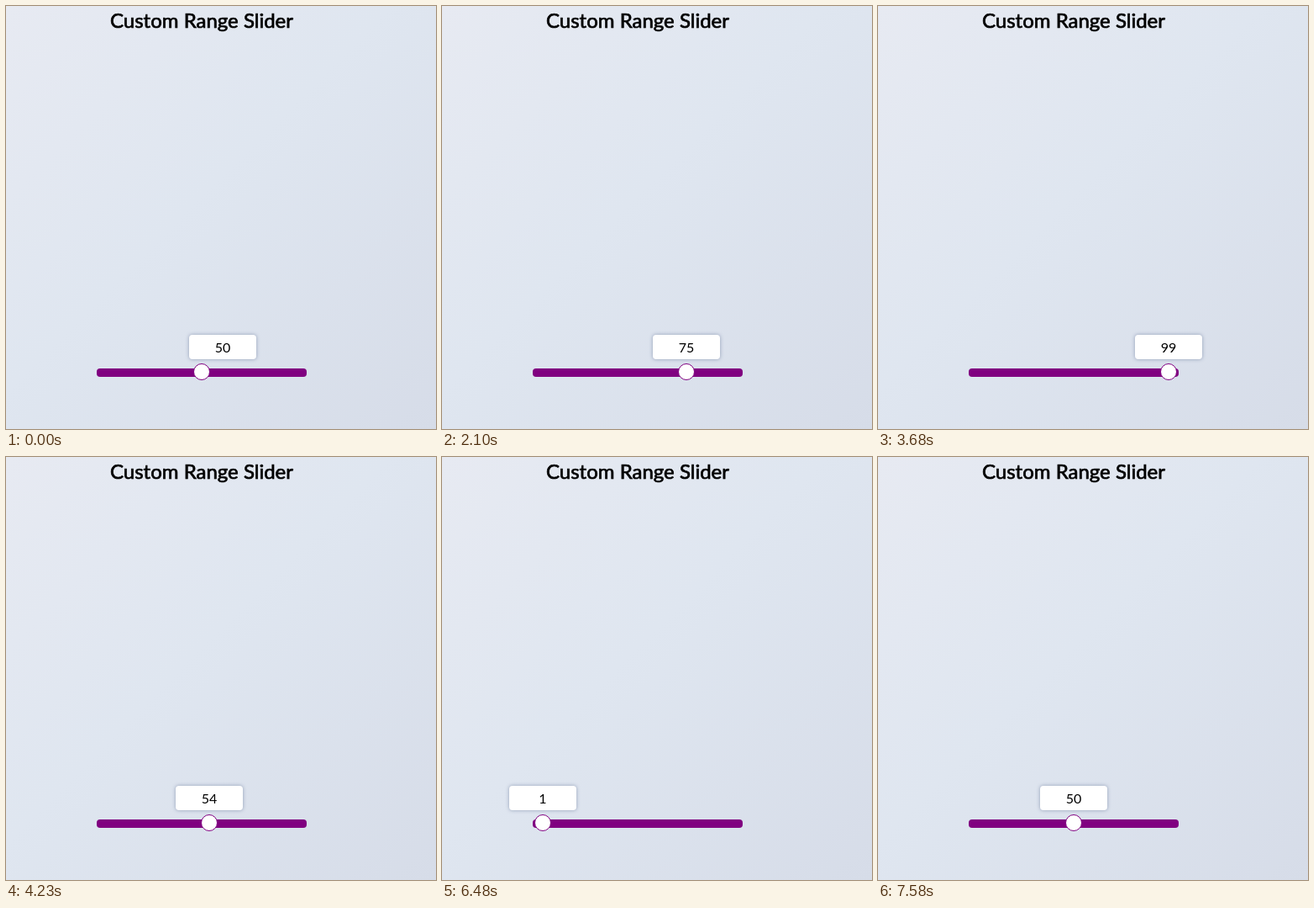
Write an HTML page that moves like this. It is 512 px wide and 503 px high and loops after 8520 ms.

```html
<!DOCTYPE html>
<html lang="en">
<head>
<meta charset="utf-8">
<title>Custom Range Slider</title>
<style>
  html, body { margin: 0; width: 100%; height: 100%; overflow: hidden; }
  body {
    position: relative;
    font-family: Lato, sans-serif;
    color: #000;
    background: linear-gradient(135deg, #e7eaf2, #dfe6f0 45%, #d6dce8);
  }
  h2 {
    position: absolute; left: 0; top: 2px; width: 466px; margin: 0;
    font-size: 24px; font-weight: 400; line-height: 29px; text-align: center;
    -webkit-text-stroke: .7px #000;
  }
  .track {
    position: absolute; left: 108px; top: 431px; width: 250px; height: 10px;
    border-radius: 4px; background: #800080;
  }
  .thumb {
    position: absolute; left: -10px; top: 425px; width: 20px; height: 20px;
    box-sizing: border-box; border: 1px solid #800080; border-radius: 50%; background: #fff;
  }
  .bubble {
    position: absolute; left: -40px; top: 391px; width: 80px; height: 29px;
    border-radius: 4px; background: #fff; box-shadow: 0 0 4px rgba(70, 90, 130, .5);
    font-size: 16px; line-height: 29px; text-align: center;
  }
</style>
</head>
<body>
<h2>Custom Range Slider</h2>
<div class="track"></div>
<div class="thumb"></div>
<output class="bubble">50</output>
<script>
const LOOP = 8520;
const TICK = 68.5;

// Each drag slows down towards its end; a higher ease slows it more
const drags = [
  { start: 1140, end: 3150, from: 51, to: 100, ease: 1.05 },
  { start: 3680, end: 5400, from: 99, to: 0, ease: 1.56 },
  { start: 6480, end: 7580, from: 1, to: 50, ease: 1.6 }
];

const thumb = document.querySelector('.thumb');
const bubble = document.querySelector('.bubble');

function dragValue({ start, end, from, to, ease }, t) {
  const ticks = Math.round((end - start) / TICK);
  const progress = (t - start) / (end - start);
  const stepped = Math.min(1, Math.floor(progress * ticks + .2) / ticks);
  return Math.round(from + (to - from) * (1 - (1 - stepped) ** ease));
}

const moveTo = (el, x) => { el.style.transform = `translateX(${x}px)`; };

function draw(t) {
  const drag = drags.filter(d => d.start <= t).pop();
  const value = drag ? dragValue(drag, t) : 50;
  const x = Math.round(118 + 2.3 * value);
  moveTo(thumb, x);
  // The bubble sits off-centre until the first drag
  moveTo(bubble, drag ? x : 258);
  bubble.textContent = value;
}

const start = performance.now();
function frame() {
  draw((performance.now() - start) % LOOP);
  requestAnimationFrame(frame);
}
frame();
</script>
</body>
</html>
```
